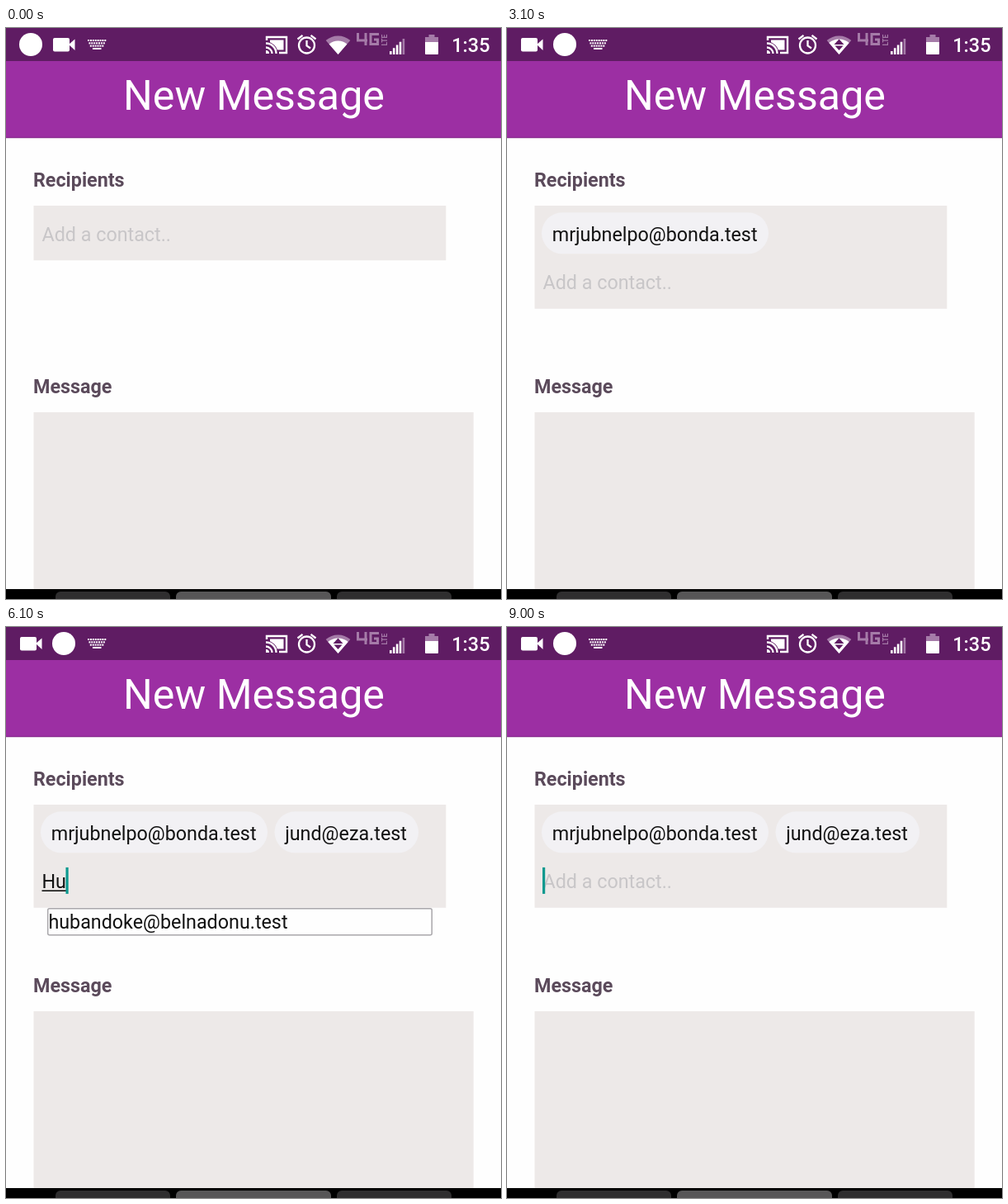
An HTML page with a canvas for the animation above (9.1 s loop, 600 by 691 pixels).

```html
<!DOCTYPE html>
<html lang="en">
<head>
<meta charset="utf-8">
<title>New Message</title>
<style>
  html, body { margin: 0; width: 100%; height: 100%; overflow: hidden; background: #fefefe; }
  canvas { display: block; }
</style>
</head>
<body>
<canvas id="stage" width="600" height="691"></canvas>
<script>
const ctx = document.getElementById('stage').getContext('2d');
const LOOP = 9100, LINE = 58.4, ROW = 31.75, SIZE = 23.3;
const FIELD = '#ede9e8', LABEL = '#5b4a5b', BAR = '#5f1c63', DIM = '#a57ba8';

const MRJUB = 'mrjubnelpo@bonda.test';
const JAPENDU = 'japendu@oka.test';
const JUND = 'jund@eza.test';
const HUB = 'hubandoke@belnadonu.test';

// Chip boxes: x, width, line
const CHIPS = [[MRJUB, 42, 275, 0], [JUND, 325.5, 174.5, 0], [HUB, 42, 317.5, 1]];

// start, chips, input line, typed text, suggestions, blink start, pressed row, press start
const STATES = [
  [0, 0, 0, '', [], null],
  [300, 0, 0, '', [], 300],
  [800, 0, 0, 'J', [MRJUB, JAPENDU, JUND], 800],
  [1100, 0, 0, 'Ju', [MRJUB, JUND], 1100],
  [1500, 0, 0, 'Jub', [MRJUB], 1500, 0, 2050],
  [2400, 1, 1, '', [], 2300],
  [3200, 1, 1, 'J', [MRJUB, JAPENDU, JUND], 3200, 2, 3800],
  [4200, 2, 1, '', [], 4400],
  [5400, 2, 1, 'H', [HUB], 5400],
  [5900, 2, 1, 'Hu', [HUB], 5900, 0, 6400],
  [6800, 3, 2, '', [], 7000],
  [8400, 2, 1, '', [], 7000]
];

// Key popups: letter, centre x, from, to
const POPUPS = [['u', 390, 950, 1100], ['b', 330, 0, 0], ['u', 390, 5750, 5950]];
POPUPS[0] = ['o', 510, 950, 1100];
POPUPS[1] = ['e', 150, 1400, 1550];

const between = (t, a, b) => t >= a && t < b;
const fade = (t, start) => 1 - 0.8 * Math.min(1, Math.max(0, (t - start) / 150));

function rect(x, y, w, h, color, radius = 0) {
  ctx.fillStyle = color;
  ctx.beginPath();
  ctx.roundRect(x, y, w, h, radius);
  ctx.fill();
}

function text(str, x, y, color = '#111', size = SIZE, weight = 400, align = 'left') {
  ctx.font = `${weight} ${size}px Roboto, sans-serif`;
  ctx.textAlign = align;
  ctx.fillStyle = color;
  ctx.fillText(str, x, y);
}

function shape(points, color) {
  ctx.fillStyle = color;
  ctx.beginPath();
  points.forEach(([x, y]) => ctx.lineTo(x, y));
  ctx.fill();
}

function stroke(path, color, width) {
  ctx.strokeStyle = color;
  ctx.lineWidth = width;
  ctx.stroke(new Path2D(path));
}

function disc(x, y, r, color, from = 0, to = Math.PI * 2) {
  ctx.fillStyle = color;
  ctx.beginPath();
  if (to - from < 6) ctx.moveTo(x, y);
  ctx.arc(x, y, r, from, to);
  ctx.fill();
}

function wifi(active) {
  const up = -Math.PI / 2, half = 0.72;
  disc(402.5, 32, 22.5, DIM, up - half, up + half);
  disc(402.5, 32, active ? 18.5 : 16.5, '#fff', up - half, up + half);
  if (!active) return;
  shape([[396.5, 20], [402.5, 13.5], [408.5, 20]], BAR);
  shape([[397.5, 21.5], [402.5, 27], [407.5, 21.5]], BAR);
}

function statusBar(t) {
  rect(0, 0, 600, 40, BAR);
  const swapped = t >= 300, cam = swapped ? 17 : 57;
  disc(swapped ? 70 : 30, 20, 14, '#fff');
  rect(cam, 12, 20, 16.5, '#fff', 2);
  shape([[cam + 19, 20], [cam + 26.5, 13.5], [cam + 26.5, 27]], '#fff');

  for (let row = 0; row < 3; row++)
    for (let i = 0; i < 8 - row; i++)
      rect(99 + i * 2.9 + row * 1.4, 14 + row * 3.3, 2, 2.1, '#fff');
  rect(105, 24, 10.5, 2, '#fff');

  // Cast
  stroke('M316 15V11H340V30H331', '#fff', 2.4);
  rect(320, 14.5, 16.5, 12, '#fff');
  disc(315, 31, 14.5, BAR, -Math.PI / 2, 0);
  stroke('M315 18.5A12.5 12.5 0 0 1 327.5 31M315 23.5A7.5 7.5 0 0 1 322.5 31', '#fff', 2.3);
  disc(315, 31, 4, '#fff', -Math.PI / 2, 0);

  // Alarm
  stroke('M355 21A9.5 9.5 0 0 1 374 21A9.5 9.5 0 0 1 355 21M364.5 15V21.5L369 24.5M353.5 13.5L359.5 8.8M375.5 13.5L369.5 8.8', '#fff', 2.3);

  wifi(between(t, 300, 4500) || between(t, 5700, 7400) || t >= 8300);

  stroke('M426.5 6V15H438M436 6V21M452 7.5H442V19.5H450.5V14H446', DIM, 3);
  ctx.save();
  ctx.translate(461.5, 21.5);
  ctx.rotate(-Math.PI / 2);
  text('LTE', 0, 0, DIM, 8.5, 700);
  ctx.restore();

  for (let i = 0; i < 5; i++) {
    const h = 4 + i * 3.75;
    rect(465 + i * 3.9, 32 - h, 2.6, h, i < 4 ? '#fff' : DIM);
  }
  rect(512.5, 8, 7, 4, DIM);
  rect(508, 11, 16, 7, DIM);
  rect(508, 17, 16, 15, '#fff', [0, 0, 1, 1]);
  text('1:35', 586.5, 29, '#fff', 23.5, 500, 'right');
}

function recipients(t) {
  const [, chips, line, typed, list, blink, pressed, pressAt] = STATES.findLast(s => t >= s[0]);
  const shift = line * LINE, bottom = 281.3 + shift, base = 258 + shift;
  rect(33.5, 215, 499.8, bottom - 215, FIELD);

  CHIPS.slice(0, chips).forEach(([name, x, w, row], i) => {
    ctx.globalAlpha = i === 2 ? fade(t, 8150) : 1;
    rect(x, 223.3 + row * LINE, w, 50, '#f2f1f4', 25);
    text(name, x + 12.7, 258 + row * LINE);
    ctx.globalAlpha = 1;
  });

  text(typed || 'Add a contact..', 43.5, base, typed ? '#111' : '#c8c6c8');
  const width = typed ? ctx.measureText(typed).width : 0;
  if (typed) rect(43.5, base + 2, width, 1.6, '#111');
  if (blink !== null && (t - blink) % 1000 < 500)
    rect(43 + width, base - 25.5, 3.2, 32, '#0b998f');

  if (!list.length) return;
  ctx.strokeStyle = '#a9a7ab';
  ctx.lineWidth = 1.5;
  ctx.fillStyle = '#fefefe';
  ctx.beginPath();
  ctx.roundRect(50.7, bottom + 1, 465.5, list.length * ROW + 0.3, 2);
  ctx.fill();
  ctx.stroke();
  list.forEach((name, i) => {
    ctx.globalAlpha = i === pressed ? fade(t, pressAt) : 1;
    text(name, 51.4, bottom + 25.6 + i * ROW);
    ctx.globalAlpha = 1;
  });
}

function keyboard(t) {
  rect(0, 679, 600, 12, '#000');
  rect(60, 682, 139, 20, '#2f2e2f', 6);
  rect(206, 682, 188, 20, '#575657', 6);
  rect(401, 682, 139, 20, '#2f2e2f', 6);
  for (const [key, x, from, to] of POPUPS) {
    if (!between(t, from, to)) continue;
    rect(x - 35, 649, 70, 60, '#0487b0', [0, 7, 0, 0]);
    text(key, x, 706, '#fff', 41, 500, 'center');
  }
}

function draw(now) {
  const t = now % LOOP;
  rect(0, 0, 600, 691, '#fefefe');
  rect(0, 40, 600, 93, '#9c2fa3');
  rect(0, 132, 600, 1.3, '#85288c');
  text('New Message', 300.5, 99, '#fff', 50.2, 400, 'center');
  statusBar(t);
  text('Recipients', 33, 192, LABEL, SIZE, 700);
  text('Message', 33, 442, LABEL, SIZE, 700);
  rect(33.5, 465, 533.2, 214, FIELD);
  recipients(t);
  keyboard(t);
  requestAnimationFrame(draw);
}
requestAnimationFrame(draw);
</script>
</body>
</html>
```
